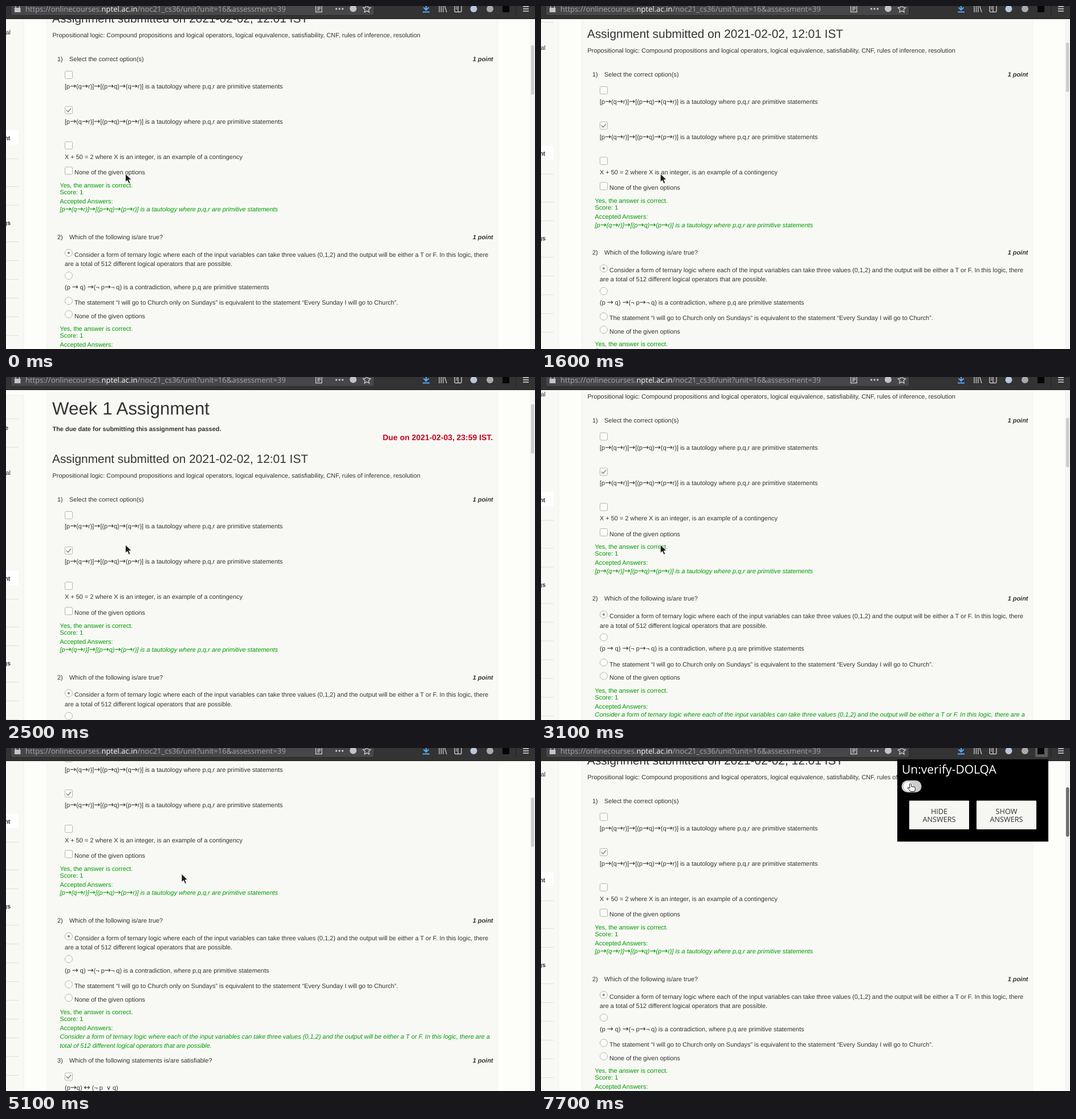
Write an HTML page that moves like this. It is 928 px wide and 603 px high and loops after 8000 ms.

```html
<!DOCTYPE html>
<html lang="en">
<head>
<meta charset="utf-8">
<title>Assignment page</title>
<style>
  html, body { margin: 0; width: 100%; height: 100%; overflow: hidden; background: #fdfefa; }
  svg { display: block; }
  text { font: 10.95px "Liberation Sans", Arial, sans-serif; fill: #333; text-rendering: geometricPrecision; white-space: pre; }
  .b { font-weight: bold; }
  .i { font-style: italic; }
  .g { fill: #090; }
  .end { text-anchor: end; }
  .h1 { font-size: 31.3px; }
  .h2 { font-size: 20.88px; }
  .due { font-size: 13.92px; fill: #c8001e; }
  .arrow { font-family: "DejaVu Sans", sans-serif; font-size: 13.2px; }
  .ui { font-family: "Open Sans", "Noto Sans", sans-serif; font-size: 13.1px; fill: #a5a5a8; }
  .title { font-size: 21px; fill: #fff; }
  .btn { font-size: 12.7px; fill: #333; text-anchor: middle; }
  .box { fill: #fbfbf9; stroke: #b4b4b2; }
  .tick { fill: none; stroke: #8a8a88; stroke-width: 1.6; }
  .rule { stroke: #dededb; }
  .icon { fill: none; stroke: #c4c4c6; stroke-width: 1.4; }
</style>
</head>
<body>
<svg width="928" height="603" viewBox="0 0 928 603">
  <rect width="928" height="603" fill="#fdfefa"/>
  <rect x="71.5" y="-1" width="791" height="606" fill="#f8f9f5" stroke="#f1f2ee"/>
  <g id="page"></g>

  <rect x="919" y="22" width="9" height="581" fill="#f5f5f3"/>
  <rect id="thumb" x="921" y="69" width="5.5" height="87" rx="2.7"/>

  <g id="toolbar">
    <rect width="928" height="23" fill="#333334"/>
    <path d="M0 22.5H928" stroke="#1b1b1c"/>
    <path d="M8.5-4V13q0 3.5 4 3.5H642q4 0 4-3.5V-4" fill="#474749" stroke="#29292a"/>
    <path d="M15 3h10.5v8H15z" fill="#c4c4c6"/>
    <path class="icon" d="M17 4V0q0-3 3.2-3T23.5 0V4"/>
    <text class="ui" x="34" y="10">https://onlinecourses.<tspan fill="#f9f9fa">nptel.ac.in</tspan>/noc21_cs36/unit?unit=16&amp;assessment=39</text>
    <path class="icon" d="M543.5-2V10.5H554V-2M546 2h6M546 4.5h6M546 7h4"/>
    <g fill="#c4c4c6">
      <circle cx="579.5" cy="5" r="1.7"/><circle cx="585" cy="5" r="1.7"/><circle cx="590.5" cy="5" r="1.7"/>
      <circle cx="609" cy="4.5" r="6"/>
    </g>
    <path class="icon" d="M633-2l2 4.300 4.600.6-3.400 3.300.9 4.700-4.100-2.300-4.100 2.300.9-4.700-3.400-3.300 4.600-.6z"/>
    <path d="M737-3V6M732.5 2.5L737 7l4.5-4.5M731 10.5h12" fill="none" stroke="#5aa9f8" stroke-width="2"/>
    <path class="icon" d="M760-2V11M763.5-2V11M767-2V11M769-2l4 13"/>
    <path class="icon" d="M787-2V8.5q0 2 2 2h8q2 0 2-2V-2M793-2V10.5M789 2h2.5M789 5h2.5"/>
    <circle cx="820.5" cy="5" r="6" fill="#b9c8dc"/>
    <circle cx="849" cy="5" r="6" fill="#a9a9a9"/>
    <rect id="pressed" x="867" y="-5" width="22" height="21" rx="2" fill="#5c5c5e"/>
    <rect x="871" y="-1" width="12" height="12" fill="#060606"/>
    <path d="M894.5 0V17" stroke="#202021"/>
    <path class="icon" d="M907 1h10M907 5h10M907 9h10" style="stroke:#e0e0e2"/>
  </g>

  <g id="popup">
    <rect x="625" y="20" width="265" height="144.5"/>
    <text class="ui title" x="633" y="44.5">Un:verify-DOLQA</text>
    <rect x="632.5" y="57" width="35" height="21" rx="10.5" fill="#ccc"/>
    <circle cx="644" cy="67.5" r="8" fill="#fff"/>
    <g id="buttons"></g>
  </g>

  <path id="pointer" d="M0 0V14.5L3.4 11.4 6 17.2 8.5 16.1 6 10.6 10.5 10.3z" fill="#1c1c1c" stroke="#f4f4f4" stroke-width=".9"/>
  <path id="hand" d="M646.5 63.5q1.5-2 3 0V67.5l5.5 1.2q2 .6 1.6 3L655.5 76.5h-7L643.5 71q-.3-2 1.8-1.2l1.7 1.2z" fill="#fff" stroke="#111"/>
</svg>
<script>
const $ = id => document.getElementById(id);
const text = (x, y, s, cls = "") =>
  `<text x="${x}" y="${y}" class="${cls}">${s.replace(/[→↔]/g, '<tspan class="arrow">$&</tspan>')}</text>`;
const rule = y => `<path class="rule" d="M0 ${y + .5}H22"/>`;

const marks = {
  check: (y, on) => `<rect class="box" x="103.5" y="${y - 6.5}" width="13" height="13" rx="2"/>` +
    (on ? `<path class="tick" d="M106 ${y}l3 3 5-6"/>` : ""),
  radio: (y, on) => `<circle class="box" cx="110" cy="${y}" r="6.5"/>` +
    (on ? `<circle cx="110" cy="${y}" r="2" fill="#858583"/>` : "")
};
const lineHeight = 16.5;

// Options flow downwards; a block option has its text below the mark, a tall one extra space after it.
function question(n, y, title, kind, options, answers) {
  let out = text(90, y, n + ")") + text(111, y, title) + text(854.5, y, "1 point", "b i end");
  y += 24.3;
  for (const { lines: [first, ...rest], on, block, tall } of options) {
    out += marks[kind](y, on) + (block ? text(103, y + 23.5, first) : text(120, y + 6.5, first));
    rest.forEach((s, k) => out += text(103, y + 6.5 + lineHeight * (k + 1), s));
    y += (block ? 44.5 : 23.5) + (tall ? 17.5 : 0) + lineHeight * rest.length;
  }
  y += 5.7;
  out += text(94.5, y, "Yes, the answer is correct.", "g") + text(94.5, y + 12, "Score: 1", "g") +
    text(94.5, y + 28, "Accepted Answers:", "g");
  answers.forEach((s, k) => out += text(94.5, y + 42.7 + lineHeight * k, s, "g i"));
  return out;
}

const tautology = last => `[p→(q→r)]→[(p→q)→(${last}→r)] is a tautology where p,q,r are primitive statements`;
const ternary = "Consider a form of ternary logic where each of the input variables can take three values (0,1,2) and the output will be either a T or F. In this logic, there";
const total = "total of 512 different logical operators that are possible.";
const none = { lines: ["None of the given options"] };

const sidebar =
  `<rect x="-1" y="-90" width="32" height="1000" fill="#f8f9f5" stroke="#eeefeb"/>` +
  `<rect y="218.5" width="22" height="25" fill="#fff"/>` +
  [-49, 1, 268, 317, 350].map(rule).join("") +
  Array.from({ length: 10 }, (_, k) => rule(414 + 33 * k)).join("") +
  text(4, -29, "e", "b end") + text(8, 50, "al", "end") +
  text(7.5, 236, "nt", "b end") + text(8, 385, "gs", "b end");

$("page").innerHTML = sidebar +
  text(81, -56, "Week 1 Assignment", "h1") +
  text(81.5, -27, "The due date for submitting this assignment has passed.", "b") +
  text(854, -10.5, "Due on 2021-02-03, 23:59 IST.", "b due end") +
  text(81, 29, "Assignment submitted on 2021-02-02, 12:01 IST", "h2") +
  text(81.5, 54.7, "Propositional logic: Compound propositions and logical operators, logical equivalence, satisfiability, CNF, rules of inference, resolution") +
  question(1, 96.7, "Select the correct option(s)", "check", [
    { lines: [tautology("q")], block: true, tall: true },
    { lines: [tautology("p")], block: true, tall: true, on: true },
    { lines: ["X + 50 = 2 where X is an integer, is an example of a contingency"], block: true },
    none
  ], [tautology("p")]) +
  question(2, 409.7, "Which of the following is/are true?", "radio", [
    { lines: [ternary, "are a " + total], on: true },
    { lines: ["(p → q) →(¬ p→¬ q) is a contradiction, where p,q are primitive statements"], block: true },
    { lines: ["The statement “I will go to Church only on Sundays” is equivalent to the statement “Every Sunday I will go to Church”."] },
    none
  ], [ternary + " are a", total]) +
  question(3, 656.3, "Which of the following statements is/are satisfiable?", "check", [
    { lines: ["(p→q) ↔ (¬ p  ∨ q)"], block: true, on: true }
  ], []);

$("buttons").innerHTML = ["HIDE", "SHOW"].map((word, k) => {
  const x = 698.5 + 118 * k;
  return `<rect x="${x - 52.5}" y="92.5" width="105" height="50.5" rx="1" fill="#f6f6f3"/>` +
    text(x, 115.5, word, "ui btn") + text(x, 130, "ANSWERS", "ui btn");
}).join("");

const clamp = v => Math.min(1, Math.max(0, v));
const easeOut = f => 1 - (1 - f) ** 2;
const smooth = f => f * f * (3 - 2 * f);

// Wheel turns: start, notches (positive scrolls up), pause between notches.
const notch = 51.5;
const wheel = [[500, -2, 0], [1100, 1, 0], [1400, 5, 120], [2300, -3, 100], [3000, -2, 0], [3700, -1, 0], [5100, 2, 0]];

function scrollAt(t) {
  let y = 0;
  for (const [start, count, gap] of wheel)
    for (let k = 0; k < Math.abs(count); k++)
      y += Math.sign(count) * notch * easeOut(clamp((t - start - k * gap) / 240));
  return y;
}

// Mouse strokes: start, duration, end point, sideways bend.
const strokes = [
  [4100, 200, 145, 323, 0], [4300, 600, 270, 208, 70], [5000, 300, 417, 209, -18],
  [5400, 300, 850, 8, 0], [5900, 150, 911, 16, 0], [6100, 300, 815, 6, 0],
  [6400, 200, 874, 6, 0], [6700, 100, 828, 31, 0], [6900, 600, 645, 62, 78]
];

function pointerAt(t) {
  let x = 209.5, y = 295;
  for (const [start, duration, endX, endY, bend] of strokes) {
    if (t <= start) break;
    const f = smooth(clamp((t - start) / duration));
    const dx = endX - x, dy = endY - y;
    const side = bend * Math.sin(Math.PI * f) / Math.hypot(dx, dy);
    x += dx * f + dy * side;
    y += dy * f - dx * side;
  }
  return [x, y];
}

const show = (id, on) => $(id).setAttribute("visibility", on ? "visible" : "hidden");
const move = (id, x, y) => $(id).setAttribute("transform", `translate(${x} ${y})`);

function draw() {
  const t = Math.floor(performance.now() % 8000 / 100) * 100; // ten pictures a second
  const scroll = scrollAt(t);
  move("page", 0, scroll);
  move("thumb", 0, -scroll * .174);
  move("pointer", ...pointerAt(t));
  $("thumb").setAttribute("fill", t < 6100 ? "#cdcdcb" : "#6e6e6d");
  show("popup", t >= 6800);
  show("pressed", t >= 6800);
  show("pointer", t < 7700);
  show("hand", t >= 7700);
  requestAnimationFrame(draw);
}
draw();
</script>
</body>
</html>
```
